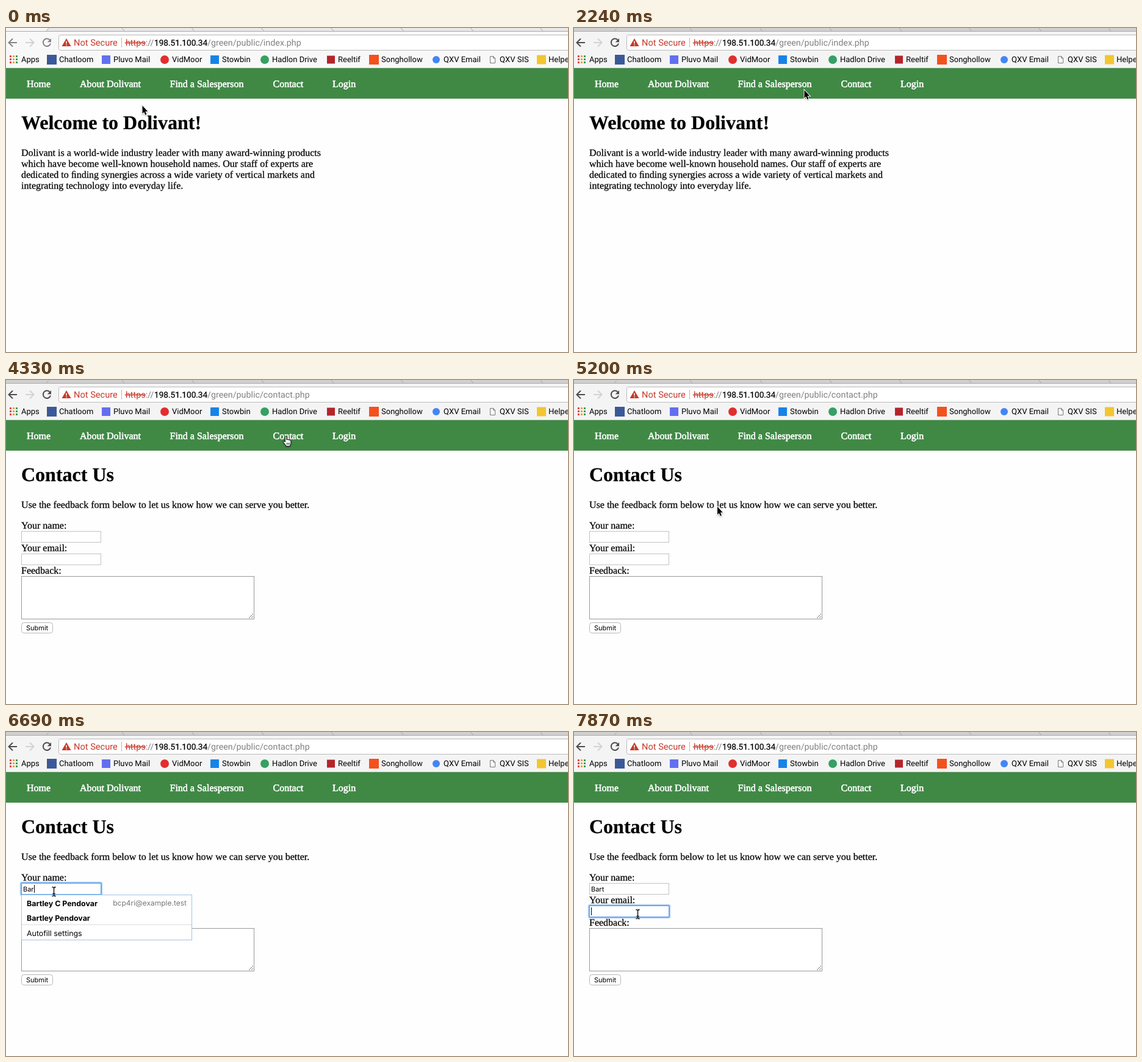
Animation, 921 px wide and 532 px high, one loop 8000 ms. Source, as an HTML page:

```html
<!DOCTYPE html>
<html lang="en">
<head>
<meta charset="utf-8">
<title>Contact form walkthrough</title>
<style>
  html, body { margin: 0; width: 100%; height: 100%; overflow: hidden; background: #fff; }
  svg { display: block; width: 921px; height: 532px; }
  text { text-rendering: geometricPrecision; white-space: pre; }
  .page { font: 16px "Liberation Serif", serif; stroke: #000; stroke-width: .25px; }
  .page .title { font-size: 32px; font-weight: bold; }
  .nav { font: 16px "Liberation Serif", serif; fill: #fff; stroke: #fff; stroke-width: .6px; }
  .url { font: 14.3px Roboto, sans-serif; }
  .url .secure { font-size: 14.6px; }
  .url .host { font-size: 13.6px; stroke: #000; stroke-width: .25px; }
  .marks { font: 13px Roboto, sans-serif; }
  .field { font: 11px Inter, sans-serif; }
  .popup { font: 12.4px Inter, sans-serif; }
  .popup .name { font-weight: 700; }
  .popup .mail { font-size: 12px; fill: #777; text-anchor: end; }
  .line { fill: none; stroke-width: 2; }
  #cursor { filter: drop-shadow(0 1px 1px rgba(0, 0, 0, .3)); }
</style>
</head>
<body>
<svg viewBox="0 0 921 532">
  <rect width="921" height="532" fill="#fefefe"/>

  <!-- browser chrome -->
  <rect id="toolbar" width="921" height="66"/>
  <rect id="strip" width="921" height="5"/>
  <path id="frame" d="M0 0H70L66 5H0Z"/>
  <path id="tabs" fill="none" stroke="#a9a9a9" d="M0 5.5H921M70 0L66 5"/>
  <path stroke="#cbcbcb" d="M0 65.5H921"/>
  <rect x="86.5" y="11.5" width="850" height="25" rx="3" fill="#fff" stroke="#b9b9b9"/>
  <path id="back" class="line" d="M18 24H5M11 17.5L4.5 24L11 30.5"/>
  <path class="line" stroke="#d2d2d2" d="M32 24H45M39 17.5L45.5 24L39 30.5"/>
  <g id="reload">
    <path class="line" d="M72 20A6.2 6.2 0 1 0 73 25.5"/>
    <path stroke="none" d="M74 17V23.2H67.8Z"/>
  </g>
  <path id="stop" class="line" stroke="#555" d="M61.5 18.5L72.5 29.5M72.5 18.5L61.5 29.5"/>
  <path fill="#c53929" d="M99 17L106.5 30H91.5Z"/>
  <path stroke="#fff" stroke-width="1.5" d="M99 21.5V25.7M99 27V28.5"/>
  <g class="url">
    <text class="secure" x="111" y="29" fill="#c53929">Not Secure</text>
    <path stroke="#d9a9a4" d="M189.5 16V32"/>
    <text x="196" y="29" fill="#c53929">https<tspan fill="#808080">://</tspan></text>
    <path stroke="#c53929" stroke-width="1.3" d="M195 24.5H229"/>
    <text class="host" x="243" y="29">198.51.100.34</text>
    <text id="path" x="330" y="29" fill="#808080"></text>
  </g>
  <g id="marks" class="marks"></g>

  <!-- site -->
  <rect y="66" width="921" height="50" fill="#3f8945"/>
  <g class="nav">
    <text x="34" y="97">Home</text>
    <text x="121" y="97">About Dolivant</text>
    <text x="268.5" y="97">Find a Salesperson</text>
    <text x="437.5" y="97">Contact</text>
    <text x="535" y="97">Login</text>
  </g>
  <g id="home" class="page">
    <text class="title" x="25" y="166">Welcome to Dolivant!</text>
    <text x="25" y="210">Dolivant is a world-wide industry leader with many award-winning products</text>
    <text x="25" y="228">which have become well-known household names. Our staff of experts are</text>
    <text x="25" y="246">dedicated to &#xFB01;nding synergies across a wide variety of vertical markets and</text>
    <text x="25" y="264">integrating technology into everyday life.</text>
  </g>
  <g id="contact">
    <g class="page">
      <text class="title" x="25" y="166">Contact Us</text>
      <text x="25" y="210">Use the feedback form below to let us know how we can serve you better.</text>
      <text x="25" y="244">Your name:</text>
      <text x="25" y="281">Your email:</text>
      <text x="25" y="318">Feedback:</text>
    </g>
    <g fill="#fff" stroke="#c3c3c3">
      <rect x="25.5" y="248.5" width="130" height="18"/>
      <rect x="25.5" y="285.5" width="130" height="18"/>
      <rect x="25.5" y="322.5" width="381" height="70" stroke="#999"/>
      <rect x="25.5" y="398.5" width="51" height="17" rx="4" stroke="#b8b8b8"/>
      <path stroke="#777" d="M398 391L405 384M402 391L405 388"/>
    </g>
    <g id="ring" fill="none">
      <rect x="23.5" y="246.5" width="134" height="22" rx="3" stroke="#c4dcf8" stroke-width="2"/>
      <rect x="25" y="248" width="131" height="19" rx="1" stroke="#68a8ee" stroke-width="2"/>
    </g>
    <g class="field">
      <text id="typed" x="28" y="262"></text>
      <path id="caret" stroke="#000" d="M.5 0V13"/>
      <text x="33" y="411">Submit</text>
    </g>
    <g id="popup" class="popup">
      <rect id="box" x="25.5" y="267.5" width="279" fill="#fff" stroke="#a3c3e2"/>
      <text class="name" x="34" y="286">Bartley C Pendovar</text>
      <text class="mail" x="296" y="285">bcp4ri@example.test</text>
      <text class="name" x="34" y="310">Bartley Pendovar</text>
      <text id="extra" class="name" x="34" y="334">Beatrix Pendovar</text>
      <g id="settings">
        <path stroke="#dcdcdc" d="M26 316.5H304"/>
        <text x="34" y="335">Autofill settings</text>
      </g>
    </g>
  </g>

  <g id="cursor">
    <path id="arrow" stroke="#fff" stroke-width="2" paint-order="stroke"
      d="M0 0V13L2.8 10.4L4.8 15.2L6.9 14.3L4.9 9.6H8.8Z"/>
    <g id="hand" stroke="#000" stroke-linejoin="round">
      <path fill="#fff" d="M3.8 10.5V2C3.8 .2 6.4 .2 6.4 2V6.8C6.6 5.4 8.8 5.6 8.9 7C9.2 6 11.2 6.2 11.3 7.6
        C11.7 6.8 13.4 7.2 13.4 8.6V12C13.4 14 12 14.8 12 17.3H5.3C5 14.6 2.6 13.4 1 10.6C.2 9 1.8 8 2.8 9.2Z"/>
      <path d="M6.8 11.5V15M8.8 11.5V15M10.8 11.5V15" stroke-width=".8"/>
    </g>
    <g id="beam" fill="none">
      <path stroke="#fff" stroke-width="2.6" stroke-opacity=".8" d="M0-6V6"/>
      <path stroke="#111" stroke-width="1.3" d="M-3-7.5Q0-7.5 0-5Q0-7.5 3-7.5M0-5V5M-3 7.5Q0 7.5 0 5Q0 7.5 3 7.5M-2 3.5H2"/>
    </g>
  </g>
</svg>

<script>
const LOOP = 8000;
const el = id => document.getElementById(id);
const show = (id, on) => { el(id).style.display = on ? '' : 'none'; };
const set = (id, attrs) => { for (const k in attrs) el(id).setAttribute(k, attrs[k]); };

// Text x, label, icon colour, icon x, icon size, round icon
const bookmarks = [
  [25, 'Apps'],
  [87, 'Chatloom', '#3b5998', 67, 16],
  [176, 'Pluvo Mail', '#626ff0', 157, 14],
  [272, 'VidMoor', '#e02f2f', 253, 14, true],
  [354, 'Stowbin', '#1683e6', 335, 14],
  [436, 'Hadlon Drive', '#35a162', 417, 14, true],
  [544, 'Reeltif', '#b3262b', 526, 13],
  [615, 'Songhollow', '#f4511e', 595, 16],
  [717, 'QXV Email', '#4285f4', 699, 12, true],
  [809, 'QXV SIS'],
  [889, 'Helpers', '#f2c62e', 870, 15]
];

function square(x, y, size, fill, round) {
  return `<rect x="${x}" y="${y}" width="${size}" height="${size}" rx="${round ? size / 2 : 0}" fill="${fill}"/>`;
}

const gridColors = ['#dc4b3e', '#e8a33d', '#3e9d5b', '#4d87e8'];
let marks = '<path d="M793.5 46.5H798.5L801.5 49.5V57.5H793.5ZM798.5 46.5V49.5H801.5" fill="#fff" stroke="#777"/>';
for (let i = 0; i < 9; i++) {
  marks += square(6 + i % 3 * 5, 45 + Math.floor(i / 3) * 5, 3, gridColors[(i + Math.floor(i / 3)) % 4]);
}
for (const [x, label, fill, iconX, size, round] of bookmarks) {
  marks += `<text x="${x}" y="56">${label}</text>`;
  if (fill) marks += square(iconX, 52 - size / 2, size, fill, round);
}
el('marks').innerHTML = marks;

let tabEdges = el('tabs').getAttribute('d');
for (let i = 0; i < 7; i++) tabEdges += `M${190 + i * 114.3} 0l4 5`;
set('tabs', { d: tabEdges });

// Start time, shape, x, y
const pointer = [
  [0, 'arrow', 223.5, 127.5], [150, 'arrow', 240.5, 124.5],
  [450, 'arrow', 296, 121], [600, 'arrow', 343.5, 119],
  [900, 'arrow', 350, 113], [1050, 'arrow', 359, 108],
  [1200, 'arrow', 364.5, 107], [1340, 'arrow', 381, 102],
  [1490, 'arrow', 402, 92], [1640, 'arrow', 398, 90],
  [1790, 'arrow', 386, 97], [1940, 'arrow', 377.5, 102],
  [2540, 'arrow', 386, 101], [2690, 'arrow', 404, 99],
  [2840, 'arrow', 425, 96], [2990, 'hand', 446, 93],
  [3130, 'hand', 453.5, 91.5],
  [4620, 'hand', 446, 97], [4770, 'arrow', 405, 122],
  [4920, 'arrow', 330, 163], [5070, 'arrow', 235, 208],
  [5210, 'arrow', 150, 243], [5360, 'beam', 100, 258],
  [5500, 'beam', 78.5, 262],
  [6980, 'beam', 82.5, 243], [7430, 'beam', 90.5, 262],
  [7580, 'beam', 100.5, 290], [7720, 'beam', 104.5, 299]
];
const typing = [[0, ''], [6240, 'B'], [6540, 'Ba'], [6690, 'Bar'], [6840, 'Bart']];

const current = (steps, t) => steps.findLast(step => step[0] <= t);
const within = (t, from, to) => t >= from && t < to;

function render(t) {
  const active = t >= 2240;
  const onContact = t >= 4180;
  const loading = within(t, 3880, 4330);
  const ink = active ? '#4d4d4d' : '#858585';
  set('toolbar', { fill: active ? '#f4f4f4' : '#f8f8f8' });
  set('strip', { fill: active ? '#d0d0d0' : '#e8e8e8' });
  set('frame', { fill: active ? '#d0d0d0' : '#f6f6f6' });
  set('back', { stroke: ink });
  set('reload', { stroke: ink, fill: ink });
  show('reload', !loading);
  show('stop', loading);
  el('path').textContent = `/green/public/${onContact ? 'contact' : 'index'}.php`;
  show('home', !onContact);
  show('contact', onContact);

  const onEmail = t >= 7870;
  const text = current(typing, t)[1];
  el('typed').textContent = text;
  show('ring', within(t, 5650, 7720) || onEmail);
  set('ring', { transform: `translate(0 ${onEmail ? 37 : 0})` });
  show('caret', within(t, 5650, 6090) || within(t, 6240, 7720) || onEmail);
  const caretX = text && !onEmail ? 28 + Math.round(el('typed').getComputedTextLength()) : 28;
  set('caret', { transform: `translate(${caretX} ${onEmail ? 288 : 251})` });

  const extraRow = t < 6540;
  show('popup', within(t, 6240, 7430));
  show('extra', extraRow);
  set('box', { height: extraRow ? 98 : 74 });
  set('settings', { transform: `translate(0 ${extraRow ? 24 : 0})` });

  const [, shape, x, y] = current(pointer, t);
  for (const id of ['arrow', 'hand', 'beam']) show(id, id === shape);
  set('cursor', { transform: `translate(${x} ${y})` });
}

const start = performance.now();
function tick() {
  render((performance.now() - start) % LOOP);
  requestAnimationFrame(tick);
}
tick();
</script>
</body>
</html>
```
